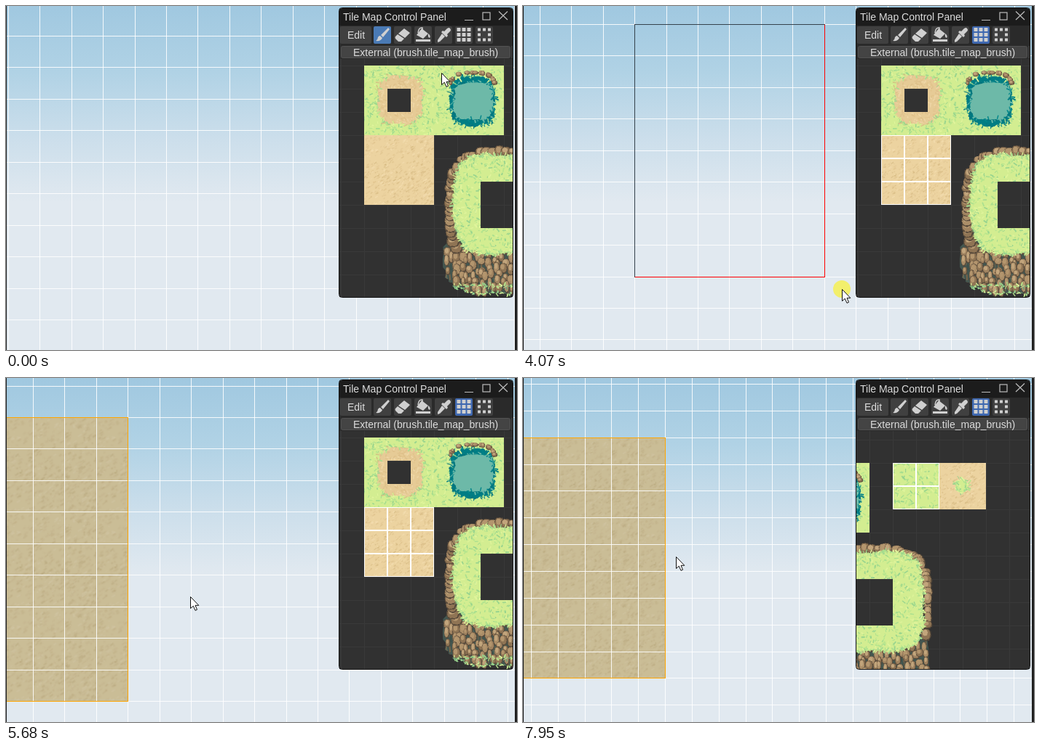
Write an HTML page with a canvas that moves like this. It is 702 px wide and 474 px high and loops after 8000 ms.

```html
<!DOCTYPE html>
<html lang="en">
<head>
<meta charset="utf-8">
<title>Tile Map Control Panel</title>
<style>
  html, body { margin: 0; width: 702px; height: 474px; overflow: hidden; background: #e3eaf0; }
  canvas, svg { position: absolute; left: 0; top: 0; display: block; }
  text { font: 14px "Liberation Sans", Arial, sans-serif; fill: #dcdcdc; }
</style>
</head>
<body>
<canvas id="scene" width="702" height="474"></canvas>
<svg width="702" height="474" viewBox="0 0 702 474">
  <path d="M458 27V7q0-4 4-4H692q4 0 4 4V27z" fill="#1c1c1c"/>
  <rect x="458" y="27" width="238" height="46" fill="#2a2a2a"/>
  <rect x="457.5" y="2.5" width="239" height="399" rx="4" fill="none" stroke="#141414"/>
  <text x="463" y="20">Tile Map Control Panel</text>
  <g fill="none" stroke="#bcbcbc" stroke-width="1.2">
    <path d="M630 19.5H642M677 7.5L689 19M689 7.5L677 19"/>
    <rect x="655" y="9" width="10" height="10"/>
  </g>
  <g id="buttons" fill="#404040"><rect x="459" y="28" width="43" height="24" rx="2"/></g>
  <rect x="460.5" y="55.5" width="232" height="16" rx="2" fill="#444" stroke="#525252"/>
  <rect x="694" y="55" width="2" height="17" fill="#3c3c3c"/>
  <text x="469" y="45">Edit</text>
  <text x="477" y="69">External (brush.tile_map_brush)</text>
  <g id="icons" fill="#d0d0d0">
    <path d="M525 30l2 2-9 11-3-3zM514 41l3 3q-2 5-9 4 3-2 3-5 1-2 3-2z"/>
    <path d="M547 31l8 6-7 7-9-6zM538 39l9 6-4 4h-4l-4-4q-1-2 0-3z"/>
    <path d="M571 31l9 7-7 7-9-5zM580 38q4 3 2 6-3-1-2-6zM563 46h20v3h-20z"/>
    <path d="M566 37q1-8 6-7v8" fill="none" stroke="#d0d0d0" stroke-width="1.5"/>
    <path d="M602 35l4-4q3-2 4 0 2 2 0 4l-4 4 1 2-2 2-7-7 2-2zM599 38l4 4-7 7-3 1 0-3z"/>
  </g>
  <g id="cursor">
    <circle id="press" r="12" fill="#fbf228" fill-opacity=".66"/>
    <path d="M.5 .5V16.500L4.300 13.200 7 19.300 9.500 18.200 7 12.300H11.800z" fill="#fff" stroke="#111"/>
  </g>
</svg>
<script>
const $ = id => document.getElementById(id);
const c = $('scene').getContext('2d');
const FPS = 15, STEPS = 120, COLS = 7, ROWS = 9, TILE = 32;

let seed = 7;
const rnd = () => (seed = (seed * 16807) % 2147483647) / 2147483647;
const between = (a, b) => a + rnd() * (b - a);
const pick = list => list[Math.floor(rnd() * list.length)];

/* ---- toolbar ---- */
function square(parent, x, y, size) {
  const r = document.createElementNS('http://www.w3.org/2000/svg', 'rect');
  Object.entries({ x, y, width: size, height: size, rx: size / 12 }).forEach(([k, v]) => r.setAttribute(k, v));
  parent.append(r);
  return r;
}
const tools = Array.from({ length: 6 }, (_, i) => square($('buttons'), 505 + 28 * i, 28, 24));
for (let i = 0; i < 9; i++) {
  const x = i % 3 * 7, y = Math.floor(i / 3) * 7;
  square($('icons'), 619.5 + x, 30 + y, 5);
  if (i !== 4) square($('icons'), 648 + x, 30.500 + y, 4);
}

/* ---- tile set, in unscrolled panel coordinates ---- */
const art = document.createElement('canvas');
const ART_X = 480, ART_Y = 70;
art.width = 380; art.height = 340;
const g = art.getContext('2d');
g.translate(-ART_X, -ART_Y);

const GRASS = '#d3ed91', BLADES = ['#a9df8f', '#b8e68d', '#e0f49c', '#98d48e'];
const LEAVES = [GRASS, GRASS, ...BLADES], WATER = ['#007d84', '#00868a', '#05737b'];
const SAND = ['#dcbf88', '#f5e0b4', '#e2c793', '#d2b47c'];

function stroke(x, y, len, angle, color) {
  g.strokeStyle = color;
  g.lineWidth = between(.8, 2);
  g.beginPath();
  g.moveTo(x, y);
  g.lineTo(x + Math.cos(angle) * len, y + Math.sin(angle) * len);
  g.stroke();
}
const blade = (x, y, colors) => stroke(x, y, between(2, 6), between(0, 6.3), pick(colors));

// Rounded square outline with a ragged edge
function ring(cx, cy, rx, ry, rough = .04, power = .6) {
  const bend = v => Math.sign(v) * Math.abs(v) ** power;
  return Array.from({ length: 72 }, (_, i) => {
    const a = i / 36 * Math.PI, k = 1 + between(-rough, rough);
    return [cx + rx * k * bend(Math.cos(a)), cy + ry * k * bend(Math.sin(a))];
  });
}
const box = (x, y, w, h) => [[x, y], [x + w, y], [x + w, y + h], [x, y + h]];

// Evenly spaced points around a closed outline
function around(points, step) {
  return points.flatMap(([x, y], i) => {
    const [u, v] = points[(i + 1) % points.length], n = Math.round(Math.hypot(u - x, v - y) / step + rnd() - .5);
    return Array.from({ length: n }, (_, k) => [x + (u - x) * k / n, y + (v - y) * k / n]);
  });
}
const fringe = (points, colors) => around(points, 2).forEach(([x, y]) => blade(x, y, colors));

// Fill an outline and scatter strokes inside it
function patch(points, base, density, draw) {
  const path = new Path2D();
  points.forEach(p => path.lineTo(...p));
  path.closePath();
  const [x0, x1, y0, y1] = [0, 1].flatMap(k => [Math.min, Math.max].map(f => f(...points.map(p => p[k]))));
  g.save();
  g.clip(path);
  g.fillStyle = base;
  g.fill(path);
  for (let i = (x1 - x0) * (y1 - y0) * density; i > 0; i--) draw(between(x0, x1), between(y0, y1));
  g.restore();
}
const grass = points => patch(points, GRASS, .04, (x, y) => blade(x, y, BLADES));
const sand = points => patch(points, '#ecd3a0', .07, (x, y) => {
  g.globalAlpha = .55;
  stroke(x, y, between(1, 5), -.6, pick(SAND));
});
function rock(x, y, rx, ry) {
  const lump = (dx, dy, k, color) => patch(ring(x + dx, y + dy, rx * k, ry * k, .1, .85), color, 0);
  lump(0, 0, 1, '#57493a');
  lump(-.3, -.5, .86, pick(['#a08360', '#8f7454', '#ab8e68']));
  lump(-rx * .2, -ry * .3, .5, pick(['#c2a57c', '#b4966e']));
}

sand(box(492, 178, 96, 96));
sand(box(780, 82, 64, 64));
grass(box(492, 82, 192, 96));
grass(box(716, 82, 64, 64));

const bush = ring(811, 114, 9, 9, .12, 1);
grass(bush);
fringe(bush, BLADES);

const dirt = ring(542, 129, 31, 34);
patch(dirt, '#e6cb96', .07, (x, y) => blade(x, y, ['#e2c58d', '#eed6a6', '#dfc18b']));
fringe(dirt, [...LEAVES, '#d3c184', '#e6cb96']);
g.clearRect(524, 114, TILE, TILE);

const pond = ring(641, 131, 31, 34);
patch(pond, WATER[0], 0);
fringe(pond, [...WATER, ...WATER, ...LEAVES]);
around(ring(641, 126, 32, 34, 0), 5).filter(p => p[1] < 108)
  .forEach(([x, y]) => rock(x, y, between(2.500, 4.500), between(2.500, 4)));
const shore = ring(642, 131, 28, 26);
patch(shore, '#6db9a8', 0);
fringe(shore, [...WATER, '#6db9a8', '#6db9a8']);

// Cliff island
const cliff = ring(684, 349, 82, 47);
patch(cliff, '#44564f', .02, (x, y) => stroke(x, y, 8, 1.500, pick(['#364b47', '#5b6a5c', '#7b6549'])));
for (let y = 336; y < 392; y += 9) {
  for (let x = 606 + y % 2 * 4; x < 766; x += 9) {
    if (Math.hypot((x - 684) / 90, (y - 330) / 74) < 1) {
      rock(x + between(-3, 3), y + between(-4, 4), between(3, 6), between(5, 9));
    }
  }
}
fringe(cliff.filter(p => p[1] > 385), [...BLADES, '#6fa77a']);
around(ring(687, 278, 77, 77, .01), 8).filter(p => p[1] < 335)
  .forEach(([x, y]) => rock(x, y, between(5, 9), between(5, 9)));
const lawn = ring(687, 273, 71, 68, .03, .55);
grass(lawn);
for (let i = 0; i < 3; i++) fringe(lawn, LEAVES);
g.clearRect(652, 242, TILE * 2, TILE * 2);

/* ---- motion, in steps of 1/15 s ---- */
const ramp = (n, a, b) => Math.max(0, Math.min(1, (n - a) / (b - a)));
const within = (n, ...spans) => spans.some(([a, b]) => n >= a && n <= b);

// [start, end, x, y]
const MOVES = [[0, 8, 627, 39], [15, 27, 503, 190], [29, 33, 571, 252], [35, 42, 330, 200], [42, 48, 138, 38],
  [49, 61, 438, 390], [61, 63, 450, 421], [66, 85, 253, 301], [86, 91, 690, 242], [91, 99, 622, 203],
  [99, 103, 502, 277], [103, 107, 526, 126], [110, 115, 553, 164], [116, 119, 210, 246]];

const pointer = n => MOVES.reduce(([x, y], [a, b, u, v]) => {
  const k = ramp(n, a, b);
  return [x + (u - x) * k, y + (v - y) * k];
}, [598, 92]);

function view(n) {
  const first = ramp(n, 42, 47), left = ramp(n, 66, 75), down = ramp(n, 75, 83);
  const zoom = 1 - .152 * ramp(n, 85, 88);
  const x = 133.6 + 20 * first - 253.4 * left - 36.5 * down;
  const y = 41.5 - 16 * first - 43.9 * left + 72.9 * down;
  return [350.5 + (x - 350.5) * zoom, 237 + (y - 237) * zoom, 43.45 * zoom];
}
function scroll(n) {
  const a = ramp(n, 91, 99), b = ramp(n, 99, 103);
  return [-88 * a - 120 * b, 74 * b - 39 * a].map(Math.round);
}

/* ---- drawing ---- */
const sky = c.createLinearGradient(0, 0, 0, 474);
['#a0c8e0', '#b0d2e5', '#cbdeeb', '#e1e9f0'].forEach((color, i) => sky.addColorStop(i * .19, color));

function rules(x, y, step, color) {
  c.fillStyle = color;
  for (let v = (x % step + step) % step; v < 702; v += step) c.fillRect(Math.floor(v), 0, 1, 474);
  for (let v = (y % step + step) % step; v < 474; v += step) c.fillRect(0, Math.floor(v), 702, 1);
}
function frame(x, y, w, h, color) {
  const l = Math.floor(x), t = Math.floor(y);
  c.strokeStyle = color;
  c.strokeRect(l + .5, t + .5, Math.floor(x + w) - l, Math.floor(y + h) - t);
}

function drawMap(n) {
  const [x, y, s] = view(n), w = COLS * s, h = ROWS * s;
  const filled = n >= 63;
  c.fillStyle = sky;
  c.fillRect(0, 0, 702, 474);
  if (filled) {
    for (let i = 0; i < COLS * ROWS; i++) {
      const col = i % COLS, row = Math.floor(i / COLS);
      c.drawImage(art, 492 - ART_X + col % 3 * TILE, 178 - ART_Y + row % 3 * TILE, TILE, TILE, x + col * s, y + row * s, s, s);
    }
    c.fillStyle = 'rgba(123,137,127,.3)';
    c.fillRect(x, y, w, h);
  }
  rules(x, y, s, 'rgba(255,255,255,.88)');
  if (filled) frame(x, y, w, h, '#ffa500');
  if (n >= 49 && !filled) {
    // The outline snaps to whole cells and trails the pointer by one step
    const [px, py] = pointer(n - 1);
    const rw = Math.round((px - x) / s) * s, rh = Math.round((py - y) / s) * s;
    if (rw > 0 && rh > 0) {
      frame(x, y, rw, rh, '#f00');
      frame(x, y, rw, 0, '#35424c');
      frame(x, y, 0, rh, '#35424c');
    }
  }
  c.fillStyle = '#202020';
  c.fillRect(0, 0, 1, 474);
  c.fillRect(699, 0, 3, 474);
}

function selectTiles(n, start, end, x, y) {
  const now = Math.min(n, end), [px, py] = pointer(now), [u, v] = scroll(now), [sx, sy] = scroll(n);
  for (let i = 0; x + i < px - u; i += TILE) {
    for (let j = 0; y + j < py - v; j += TILE) frame(x + sx + i, y + sy + j, TILE - 1, TILE - 1, '#fff');
  }
}

function drawPanel(n) {
  const [sx, sy] = scroll(n);
  c.fillStyle = '#2a2a2a';
  c.fillRect(458, 4, 238, 397);
  c.save();
  c.beginPath();
  c.rect(458, 73, 238, 328);
  c.clip();
  c.fillStyle = '#313131';
  c.fillRect(458, 73, 238, 328);
  rules(492 + sx, 82 + sy, TILE, '#393939');
  c.drawImage(art, ART_X + sx, ART_Y + sy);
  if (n >= 110) selectTiles(n, 110, 115, 716, 82);
  else if (n >= 29) selectTiles(n, 29, 33, 492, 178);
  c.restore();
}

function drawOverlay(n) {
  const [x, y] = pointer(n).map(Math.round), active = n < 10 ? 0 : 4;
  tools.forEach((t, i) => t.setAttribute('fill', i !== active ? '#404040' : active ? '#3f68b0' : '#4a7ab5'));
  $('cursor').setAttribute('transform', `translate(${x} ${y})`);
  $('cursor').style.display = within(n, [42, 46], [67, 83]) ? 'none' : '';
  $('press').style.display = within(n, [10, 13], [29, 33], [49, 62], [110, 115]) ? '' : 'none';
}

let last = -1;
function tick(now) {
  const n = Math.floor((now + 4) * FPS / 1000) % STEPS;
  if (n !== last) {
    last = n;
    drawMap(n);
    drawPanel(n);
    drawOverlay(n);
  }
  requestAnimationFrame(tick);
}
tick(0);
</script>
</body>
</html>
```
